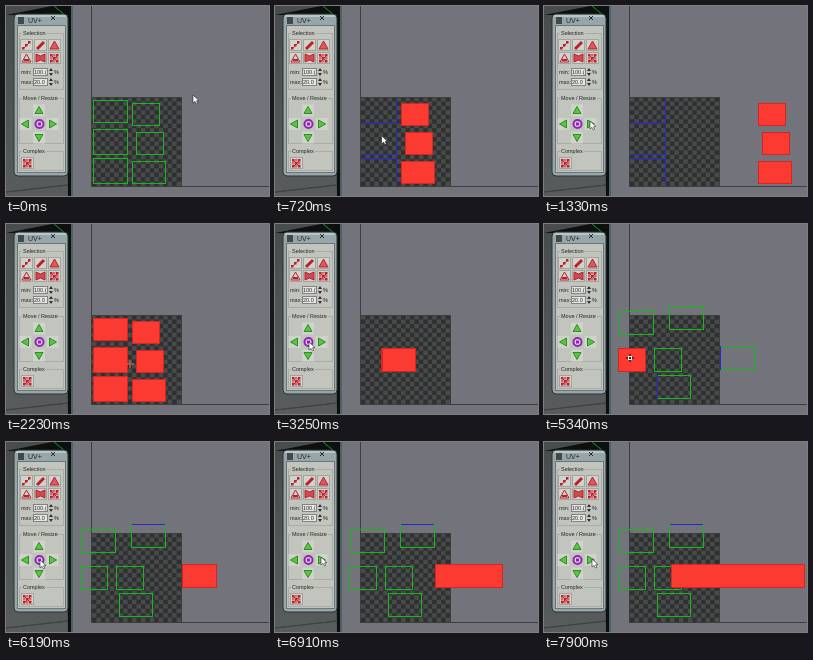
These frames come from a looping animation (263 px wide and 190 px high, 8 s). An HTML page with a canvas:

```html
<!DOCTYPE html>
<html lang="en">
<head>
<meta charset="utf-8">
<title>UV tool panel</title>
<style>
html, body { margin: 0; width: 100%; height: 100%; overflow: hidden; background: #73747b; }
canvas { display: block; width: 100vw; height: 100vh; }
</style>
</head>
<body>
<canvas id="stage" width="263" height="190"></canvas>
<script>
const g = document.getElementById('stage').getContext('2d');
const LOOP = 8000, TILE = 88;
const GREEN = '#18b81c', BLUE = '#2828cf', RED = '#bd202b', FACE = '#c2c5be';
const FONT = '"Liberation Sans", Arial, sans-serif';

// moments of the clicks
const T = {
  pickRight: 580, shift: 1040, back: 1870, pickAll: 2180, stack: 2800,
  clear: 3890, drag: 4420, pickWide: 5640, grow: [6690, 7120]
};
const DRAG_STEP = 190, DRAG_TIME = 120;

// two columns of three islands, numbered down the left, then the right
const islands = Array.from({ length: 6 }, (_, i) => {
  const row = i % 3, y = 94 + 29 * row;
  return i < 3
    ? { x: 87, y, w: 34, h: row ? 26 : 23 }
    : { x: row === 1 ? 130 : 126, y: y + 3, w: row === 2 ? 33 : 27, h: 23 };
});
// island pulled out of the stack, dx, dy
const drags = [[5, 6, 27], [0, -31, -37], [1, 19, -42], [2, 70, -2], [3, -36, 0]]
  .map(([island, dx, dy], n) => ({ island, dx, dy, at: T.drag + n * DRAG_STEP }));
const lastDrag = drags[drags.length - 1];

const START = [187, 89], MIDDLE = [124, 140], GRIP = [122, 134];
const TO_LEFT = [20, 117], TO_RIGHT = [46, 115], TO_CENTER = [34, 118];
// pointer moves: start, end, goal
const moves = [
  [180, 560, [140, 138]], [560, 960, TO_RIGHT], [1400, 1780, TO_LEFT],
  [1910, 2150, MIDDLE], [2330, 2650, TO_CENTER], [3510, 3880, [104, 158]],
  [4130, 4350, MIDDLE],
  ...drags.flatMap(({ at, dx, dy }) => [
    [at - 60, at, GRIP],
    [at, at + DRAG_TIME, [GRIP[0] + dx, GRIP[1] + dy]]
  ]),
  [5400, 5640, [192, 132]], [5820, 6170, TO_CENTER], [6320, 6610, TO_RIGHT],
  [7540, 7880, [48, 117]]
];

const mix = (a, b, p) => a + (b - a) * p;
function ease(t, a, b) {
  const p = Math.max(0, Math.min(1, (t - a) / (b - a)));
  return p * p * (3 - 2 * p);
}

function rect(x, y, w, h, color) {
  g.fillStyle = color;
  g.fillRect(x, y, w, h);
}
function frame(x, y, w, h, color) {
  g.strokeStyle = color;
  g.lineWidth = 1;
  g.strokeRect(x + .5, y + .5, w - 1, h - 1);
}
function text(s, x, y, size = 5.5) {
  g.fillStyle = '#242424';
  g.font = `${size}px ${FONT}`;
  g.fillText(s, x, y);
}
function poly(points, fill, stroke, width = 1) {
  g.beginPath();
  points.forEach(([x, y]) => g.lineTo(x, y));
  g.closePath();
  g.lineWidth = width;
  if (fill) { g.fillStyle = fill; g.fill(); }
  if (stroke) { g.strokeStyle = stroke; g.stroke(); }
}
function line(x1, y1, x2, y2, color, width = 1) {
  poly([[x1, y1], [x2, y2]], null, color, width);
}

function backdrop() {
  const shade = g.createLinearGradient(0, 0, 0, 190);
  shade.addColorStop(0, '#494c4d');
  shade.addColorStop(1, '#595c5d');
  rect(0, 0, 67, 190, shade);
  poly([[0, 9], [46, 0], [67, 0], [65, 190], [62, 190], [60, 9]], '#0d100e');
  line(48, 0, 59, 9, '#147a20');
  line(0, 186, 62, 179, '#3f4243');
  rect(65, 0, 2, 190, '#4c6266');
  rect(67, 0, 196, 190, '#73747b');
  rect(85, 0, 1, 181, '#3d3e42');
  rect(85, 180, 178, 1, '#3d3e42');

  rect(86, 91, 89, 89, '#2e3031');
  const cell = 4.45;
  for (let i = 0; i < 20; i++)
    for (let j = i % 2; j < 20; j += 2)
      rect(86 + i * cell, 91 + j * cell, cell, cell, '#484b4a');
  frame(85, 91, 91, 90, '#3a3f3a');
}

function button(x, y) {
  rect(x, y, 13, 12, '#d0d2cc');
  frame(x, y, 13, 12, '#a2a59f');
}

// red mesh icon; a full grid or only its diagonal
function mesh(x, y, full) {
  line(x + 1, y + 8, x + 8, y + 1, RED);
  if (full) line(x + 1, y + 1, x + 8, y + 8, RED);
  for (let i = 0; i < 9; i++) {
    const col = i % 3, row = (i - col) / 3;
    if (full || col + row === 2) rect(x + col * 3, y + row * 3, 2.5, 2.5, i % 2 ? '#d4656c' : RED);
  }
}

function tools() {
  for (let i = 0; i < 6; i++) button(14 + i % 3 * 14, 33 + (i > 2) * 13);
  const cone = [[48.5, 35], [53, 43], [44, 43]];
  mesh(16, 35, false);
  line(31, 43, 38, 36, RED, 3);
  poly(cone, '#dc5a5f', RED);
  poly(cone.map(([x, y]) => [x - 28, y + 13]), null, RED);
  line(18, 54, 23, 54, RED, 2);
  poly([[30, 48], [34.5, 50], [39, 48], [39, 56], [34.5, 54], [30, 56]], '#cc4a51', RED);
  mesh(44, 48, true);
  button(15, 151);
  mesh(17, 153, true);
}

function group(label, y, h) {
  frame(13, y, 45, h, '#a9aca6');
  g.font = `5.5px ${FONT}`;
  rect(16, y - 3, g.measureText(label).width + 2, 6, FACE);
  text(label, 17, y + 2);
}

function field(label, value, y) {
  text(label, 15, y + 6);
  rect(27, y, 15, 8, '#e6e7e3');
  frame(27, y, 15, 8, '#80837f');
  text(value, 28, y + 6);
  for (const side of [-1, 1])
    poly([[43, y + 4 + side], [45, y + 4 + 4 * side], [47, y + 4 + side]], '#333');
  text('%', 48, y + 6);
}

function arrow(turn) {
  g.save();
  g.translate(33, 118);
  g.rotate(turn * Math.PI / 2);
  g.translate(0, -13.5);
  rect(-6, -6, 12, 12, '#d0d2cc');
  poly([[0, -4], [4, 3], [-4, 3]], '#57c73e', '#328d29');
  g.restore();
}

function panel() {
  g.fillStyle = '#97a6aa';
  g.beginPath();
  g.roundRect(8, 8, 54, 162, 4);
  g.fill();
  g.strokeStyle = '#2b3233';
  g.lineWidth = 1;
  g.stroke();
  rect(10, 9, 50, 2, '#b9c5c8');
  rect(12, 20, 47, 146, FACE);
  frame(11, 19, 49, 148, '#6c7576');
  rect(12, 11, 6, 7, '#41494a');
  text('UV+', 22, 17, 7);
  line(45, 10, 49, 14, '#252b2c');
  line(49, 10, 45, 14, '#252b2c');
  group('Selection', 27, 57);
  tools();
  field('min:', '100.(', 62);
  field('max:', '20.0', 72);
  group('Move / Resize', 92, 46);
  for (let turn = 0; turn < 4; turn++) arrow(turn);
  g.beginPath();
  g.arc(33.5, 118, 4, 0, 7);
  g.lineWidth = 2;
  g.fillStyle = '#e6c8ec';
  g.strokeStyle = '#8a28ad';
  g.fill();
  g.stroke();
  rect(32, 116.5, 3, 3, '#8a28ad');
  group('Complex', 145, 20);
}

function isSelected(i, t) {
  if (t < T.pickRight) return false;
  if (t < T.pickAll) return i > 2;
  if (t < T.clear) return true;
  if (t >= T.pickWide) return i === 2;
  const held = drags.filter(d => t >= d.at).pop();
  return held !== undefined && held.island === i;
}

function boxOf(i, t) {
  const { x, y, w, h } = islands[i];
  if (t < T.stack) return [x + (i > 2 && t >= T.shift && t < T.back ? TILE : 0), y, w, h];
  const { dx, dy, at } = drags.find(d => d.island === i) || { dx: 0, dy: 0, at: LOOP };
  const p = ease(t, at, at + DRAG_TIME);
  const clicks = i === 2 ? T.grow.filter(c => t >= c).length : 0;
  const wide = Math.round(w * 1.98 ** clicks);
  return [Math.floor(123.5 - wide / 2 + dx * p), Math.round(124 + dy * p), wide, 24];
}

// sides shared with the current selection
function sharedSides(i, t) {
  if (t < T.pickAll) return i === 2 ? 'TR' : 'RB';
  if (t >= T.pickWide) return i === 1 ? 'T' : '';
  return t >= lastDrag.at && (i === 2 || i === 5) ? 'L' : '';
}

function island(i, t) {
  const [x, y, w, h] = boxOf(i, t);
  if (isSelected(i, t)) {
    rect(x, y, w + 1, h, '#fb3b32');
    frame(x, y, w + 1, h, '#d9241f');
    return;
  }
  const shared = t < T.pickRight ? '' : sharedSides(i, t);
  const onlyShared = t >= T.pickRight && t < T.pickAll;
  const sides = { T: [x, y, w, 1], R: [x + w, y, 1, h], B: [x, y + h - 1, w, 1], L: [x, y, 1, h] };
  for (const side in sides) {
    if (shared.includes(side)) rect(...sides[side], BLUE);
    else if (!onlyShared) rect(...sides[side], GREEN);
  }
}

function drawPointer(t) {
  let [x, y] = START;
  for (const [from, to, goal] of moves) {
    const p = ease(t, from, to);
    x = mix(x, goal[0], p);
    y = mix(y, goal[1], p);
  }
  const overAll = t > T.pickAll && t < 2360;
  if (overAll || t >= T.drag && t < 5420) {
    const color = overAll ? '#b75b55' : '#302020';
    line(x - 4, y, x + 4, y, color);
    line(x, y - 4, x, y + 4, color);
    if (!overAll) frame(Math.round(x) - 2, Math.round(y) - 2, 4, 4, '#eee');
    return;
  }
  const tip = [[0, 0], [0, 8], [2, 6.4], [3.5, 9], [4.8, 8.3], [3.5, 5.8], [6, 5.6]];
  poly(tip.map(([dx, dy]) => [x + dx, y + dy]), '#fff', '#222', .6);
}

function draw(t) {
  backdrop();
  panel();
  [...islands.keys()]
    .sort((a, b) => isSelected(a, t) - isSelected(b, t))
    .forEach(i => island(i, t));
  drawPointer(t);
}

const start = performance.now();
function tick() {
  draw((performance.now() - start) % LOOP);
  requestAnimationFrame(tick);
}
tick();
</script>
</body>
</html>
```
